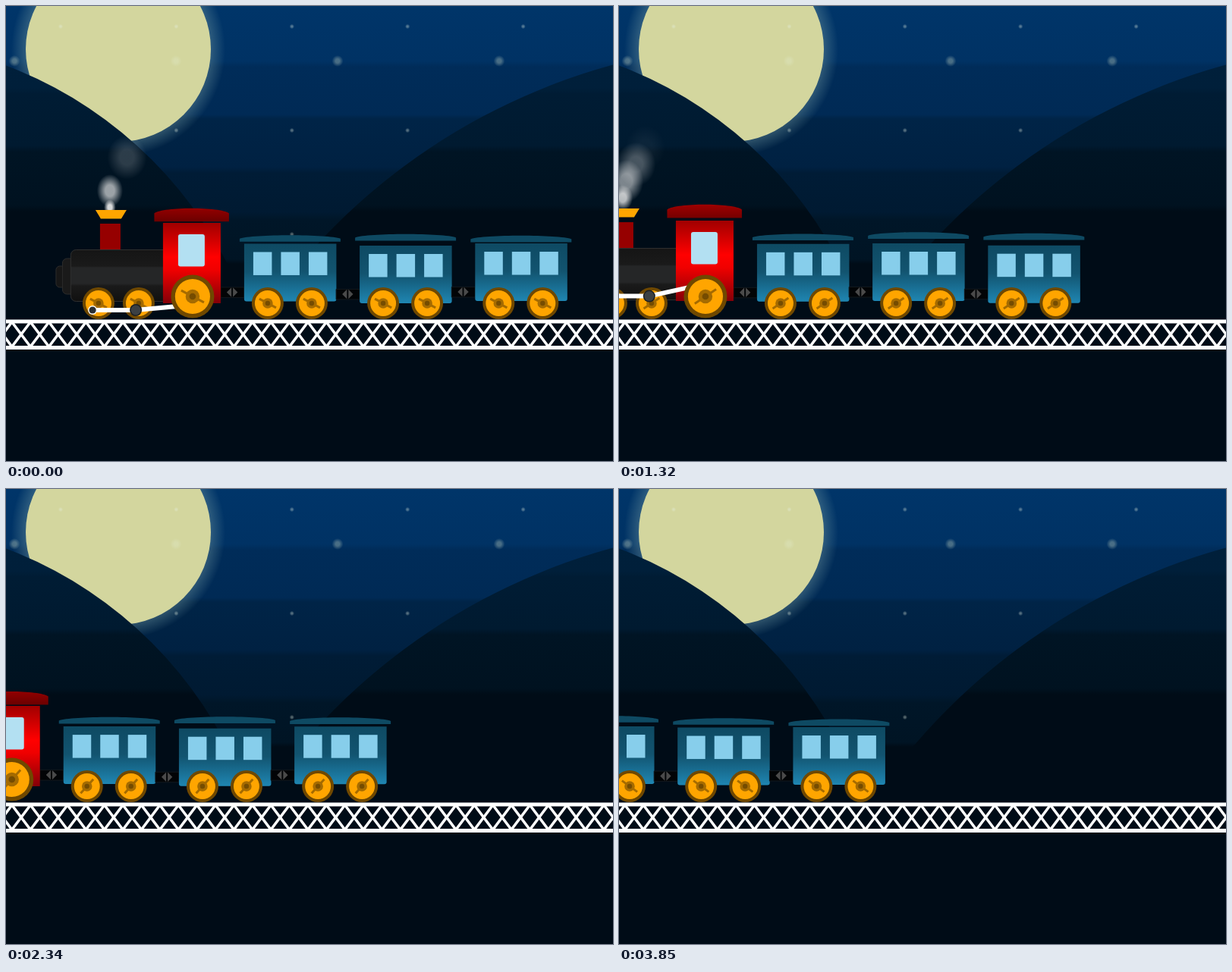
An HTML page with a canvas for the animation above (3.95 s loop, 800 by 600 pixels).

```html
<!DOCTYPE html>
<html>
<head>
<meta charset="utf-8">
<style>
html, body { margin: 0; width: 100%; height: 100%; overflow: hidden; background: #000c17; }
canvas { display: block; }
</style>
</head>
<body>
<canvas id="stage" width="800" height="600"></canvas>
<script>
const c = document.getElementById('stage').getContext('2d');
const TAU = Math.PI * 2, LOOP = 3950;

// [time in ms, distance travelled]
const TRAVEL = [[0, 0], [490, 49], [970, 94], [1030, 102], [1630, 164], [1980, 201],
  [2130, 217], [2730, 277.5], [3370, 342], [3850, 389], [LOOP, 389]];

function distance(ms) {
  const i = TRAVEL.findIndex(k => k[0] > ms);
  const [t0, d0] = TRAVEL[i - 1], [t1, d1] = TRAVEL[i];
  return d0 + (d1 - d0) * (ms - t0) / (t1 - t0);
}

const wave = (t, peak, period) => (1 + Math.cos(TAU * (t - peak) / period)) / 2;

function fade(y0, y1, ...stops) {
  const g = c.createLinearGradient(0, y0, 0, y1);
  stops.forEach(([y, color]) => g.addColorStop((y - y0) / (y1 - y0), color));
  return g;
}

function box(x, y, w, h, fill, r = 0, stroke) {
  c.beginPath();
  c.roundRect(x, y, w, h, r);
  c.fillStyle = fill;
  c.fill();
  if (stroke) { c.strokeStyle = stroke; c.lineWidth = 1; c.stroke(); }
}

function disc(x, y, r, fill) {
  c.beginPath();
  c.arc(x, y, r, 0, TAU);
  c.fillStyle = fill;
  c.fill();
}

function poly(fill, ...pts) {
  c.beginPath();
  pts.forEach(p => c.lineTo(...p));
  c.fillStyle = fill;
  c.fill();
}

function line(color, width, ...pts) {
  c.beginPath();
  pts.forEach(p => c.lineTo(...p));
  c.strokeStyle = color;
  c.lineWidth = width;
  c.stroke();
}

function glow(x, y, rx, ry, rgb, alpha, core = 0) {
  const g = c.createRadialGradient(0, 0, core, 0, 0, 1);
  g.addColorStop(0, `rgba(${rgb},${alpha})`);
  g.addColorStop(1, `rgba(${rgb},0)`);
  c.save();
  c.translate(x, y);
  c.scale(rx, ry);
  disc(0, 0, 1, g);
  c.restore();
}

function sky() {
  c.fillStyle = fade(0, 600, [0, '#003569'], [73, '#003264'], [80, '#002c59'], [143, '#002a55'],
    [149, '#002447'], [212, '#002142'], [220, '#001c36'], [272, '#001a32'], [282, '#001628'],
    [334, '#001424'], [340, '#000c17'], [600, '#000c17']);
  c.fillRect(0, 0, 800, 600);
  glow(148, 57, 141, 141, '110,150,160', .4, .865);
  disc(148, 57, 122, '#d3d69e');
  for (let x = 72; x < 800; x += 152.4)
    for (let y = 27; y < 320; y += 137) glow(x, y, 3.2, 3.2, '230,240,225', .36, .3);
  for (let x = 11; x < 800; x += 213) glow(x, 72.5, 7.5, 7.5, '225,235,205', .32, .35);
  const hill = fade(0, 600, [0, '#00203c'], [108, '#001f3a'], [116, '#001c34'], [184, '#001a30'],
    [192, '#001424'], [263, '#001220'], [271, '#000c17'], [600, '#000c17']);
  disc(-192, 586.5, 543, hill);
  disc(1017, 874.5, 826, hill);
}

function bridge() {
  box(0, 413.5, 800, 5, '#fff');
  box(0, 448, 800, 5, '#fff');
  for (let x = -4.4; x < 820; x += 24.38)
    for (const s of [-1, 1]) line('#fff', 3.6, [x - 12 * s, 417], [x + 12 * s, 449]);
}

function wheel(x, y, r, angle) {
  const k = r / 21;
  disc(x, y, r, '#6f4800');
  disc(x, y, r - 4 * k, '#ffa500');
  c.save();
  c.translate(x, y);
  c.rotate(angle);
  line('#a56b00', 3, [-12.5 * k, 0], [12.5 * k, 0]);
  c.restore();
  disc(x, y, 6.8 * k, '#a56b00');
  disc(x, y, 3.2 * k, '#754c00');
}

// Slab with a bulging top edge
function roof(x, y, w, h, bulge, fill) {
  c.beginPath();
  c.moveTo(x, y + h);
  c.lineTo(x, y + bulge + 1);
  c.bezierCurveTo(x + w * .12, y - bulge * .3, x + w * .88, y - bulge * .3, x + w, y + bulge + 1);
  c.lineTo(x + w, y + h);
  c.fillStyle = fill;
  c.fill();
}

function car(x, bodyY, roofY, angle) {
  c.save();
  c.translate(x, bodyY);
  box(-31, 370.5, 31, 13.5, '#020406', 0, '#12181d');
  poly('#4a4a4a', [-23, 377], [-16.8, 370.8], [-16.8, 383.2]);
  poly('#4a4a4a', [-8.6, 377], [-14.8, 370.8], [-14.8, 383.2]);
  box(0, 313, 121.5, 76, fade(313, 389, [313, '#0e4a63'], [350, '#125470'], [389, '#1f86b2']), [0, 0, 3, 3]);
  for (const w of [12, 48.5, 85]) box(w, 324, 24.5, 30.5, '#87ceeb');
  c.restore();
  roof(x - 6, 298 + roofY, 133, 9, 4, '#0e4a63');
  wheel(x + 31, 392, 21, angle);
  wheel(x + 89, 392, 21, angle);
}

function smoke(t) {
  for (let i = 0; i < 4; i++) {
    if (i == 2 && t < .67) continue; // this puff sets off late
    const u = (t / 1.5 + .05 + i / 4) % 1;
    glow(137 + 50 * Math.max(0, u - .35), 270 - 88 * u,
      Math.min(26, 6 + 37 * u), Math.min(29, 8 + 45 * u), '235,235,235', .95 * (1 - u), .35);
  }
}

function engine(t, angle) {
  const bob = 3 * wave(t, .01, .3);
  smoke(t);
  c.save();
  c.translate(0, bob * .67);
  box(66, 341, 12, 28, '#171717', [5, 0, 0, 5], '#2c2c2c');
  box(74.5, 331, 14, 47, '#1a1a1a', [6, 0, 0, 6], '#2c2c2c');
  box(85.5, 319.5, 124, 68, fade(319, 388, [319, '#151515'], [341, '#1a1a1a'], [343, '#252627'],
    [364, '#252627'], [367, '#1a1a1a'], [388, '#101010']), [7, 0, 0, 7], '#303030');
  box(124, 285, 27, 34, '#960000');
  poly('#ffa500', [118, 267], [159, 267], [152, 278.5], [125, 278.5]);
  c.restore();

  c.save();
  c.translate(0, bob);
  box(207, 283, 76, 106, fade(283, 389, [283, '#a00000'], [328, '#ff0000'], [345, '#f00000'], [389, '#840008']));
  box(227, 298, 35, 42.5, '#b3e0f2', 3);
  c.restore();
  roof(195.5, 261 + 5.5 * wave(t, .02, .3), 98.5, 18, 6, fade(261, 284, [261, '#a00000'], [284, '#6c0000']));

  wheel(122, 392, 21, angle);
  wheel(175, 392, 21, angle);
  const turn = angle + 1.66, dy = 10.7 * Math.sin(turn);
  const x = 120 + 10.7 * Math.cos(turn), y = 392 + dy;
  line('#fff', 6, [x, y], [x + 57, y], [x + 117, y - 60 * (.155 - .007 * dy)]);
  disc(x, y, 6, '#fff');
  disc(x, y, 4.6, '#2b2f33');
  disc(x + 57, y, 8, '#1c1f22');
  disc(x + 57, y, 6.5, '#3c4043');
  wheel(246, 383, 28.5, angle);
}

function draw(now) {
  const d = distance(now % LOOP);
  const t = d / 98.4; // seconds of rolling at constant speed
  const angle = (28 - 1.83 * d) * Math.PI / 180;
  sky();
  bridge();
  c.save();
  c.translate(-d, 0);
  // [body peak, roof peak, roof period, roof height]
  [[.215, .235, .3, 6.5], [0, .45, .6, 5], [.12, .06, .35, 6]].forEach(([body, peak, period, h], i) =>
    car(314 + 152.2 * i, 3 * wave(t, body, .3) ** 2, h * wave(t, peak, period), angle));
  engine(t, angle);
  c.restore();
}

const start = performance.now();
function tick() {
  draw(performance.now() - start);
  requestAnimationFrame(tick);
}
tick();
</script>
</body>
</html>
```
